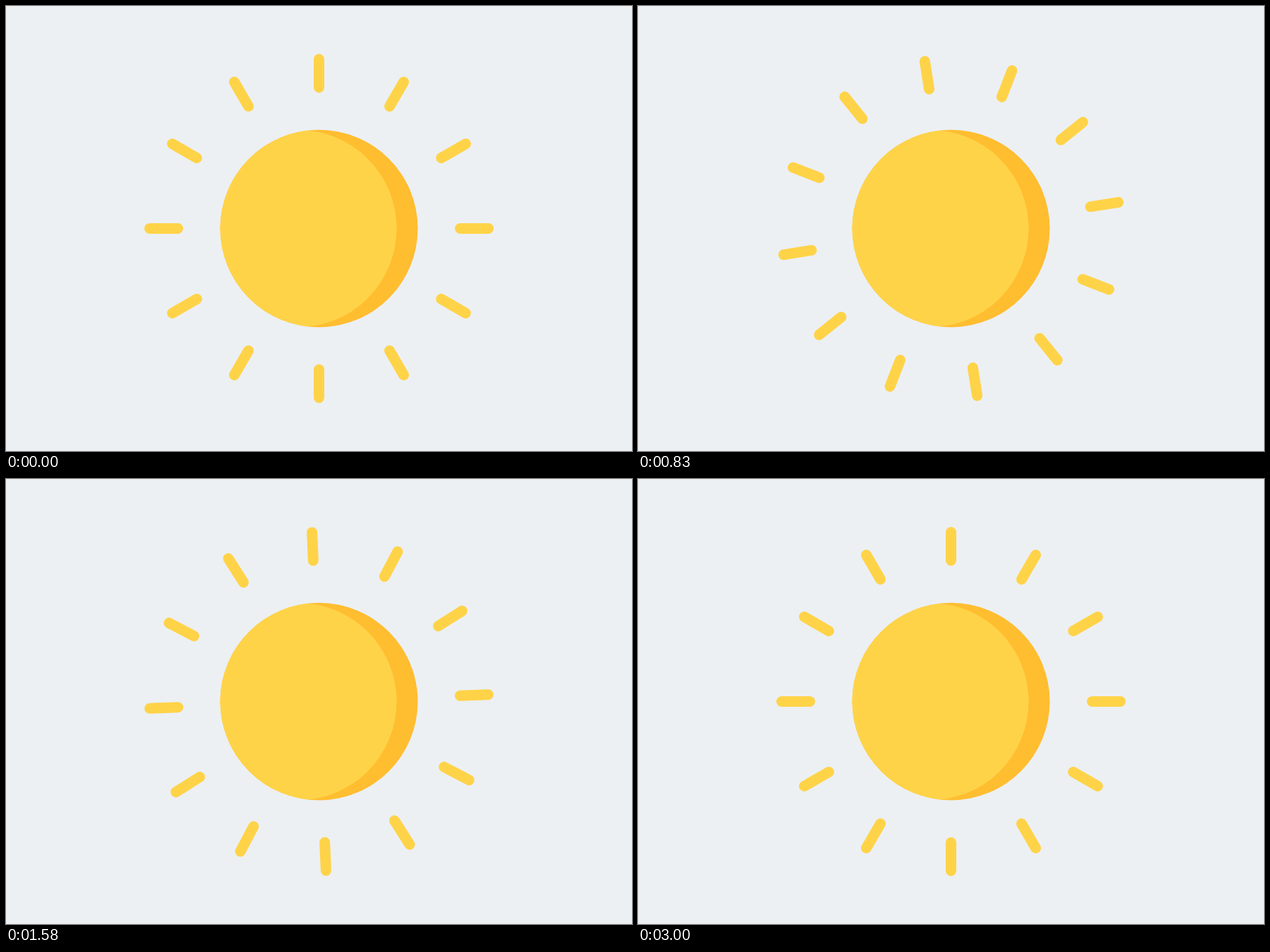
These frames come from a looping animation (887x631 px, 4040 ms). An HTML page:

```html
<!DOCTYPE html>
<html lang="en">
<head>
<meta charset="utf-8">
<title>Sun</title>
<style>
  html, body { margin: 0; width: 100%; height: 100%; overflow: hidden; background: #ecf0f3; }
  svg { display: block; width: 100%; height: 100%; }
</style>
</head>
<body>
<svg viewBox="0 0 887 631">
  <defs>
    <clipPath id="disc"><circle r="140"/></clipPath>
  </defs>
  <g transform="translate(443.5 315.5)">
    <g id="rays" stroke="#ffd348" stroke-width="15" stroke-linecap="round"></g>
    <circle r="140" fill="#ffbd30"/>
    <circle cx="-30" r="140" fill="#ffd348" clip-path="url(#disc)"/>
  </g>
</svg>
<script>
  const LOOP = 4040, STEP = 1000 / 24, SWING_END = 3000;
  // Swing keys: [time in ms, angle in degrees]
  const KEYS = [[0, 0], [747, -40], [1929, 44.2], [SWING_END, 0]];

  const rays = document.getElementById('rays');
  for (let i = 0; i < 12; i++) {
    const ray = document.createElementNS(rays.namespaceURI, 'path');
    ray.setAttribute('d', 'M0-200V-240');
    ray.setAttribute('transform', `rotate(${i * 30})`);
    rays.append(ray);
  }

  const easeInOutSine = u => (1 - Math.cos(Math.PI * u)) / 2;

  function angleAt(time) {
    const next = KEYS.findIndex(([t]) => t > time);
    if (next < 0) return 0;
    const [t0, a0] = KEYS[next - 1], [t1, a1] = KEYS[next];
    return a0 + (a1 - a0) * easeInOutSine((time - t0) / (t1 - t0));
  }

  const start = performance.now();

  function draw() {
    const time = (performance.now() - start) % LOOP;
    // The swing advances at 24 steps per second, on a 10 ms clock.
    const stepped = Math.floor((time + 3.4) / STEP) * STEP;
    rays.setAttribute('transform', `rotate(${angleAt(stepped)})`);
    requestAnimationFrame(draw);
  }
  draw();
</script>
</body>
</html>
```
